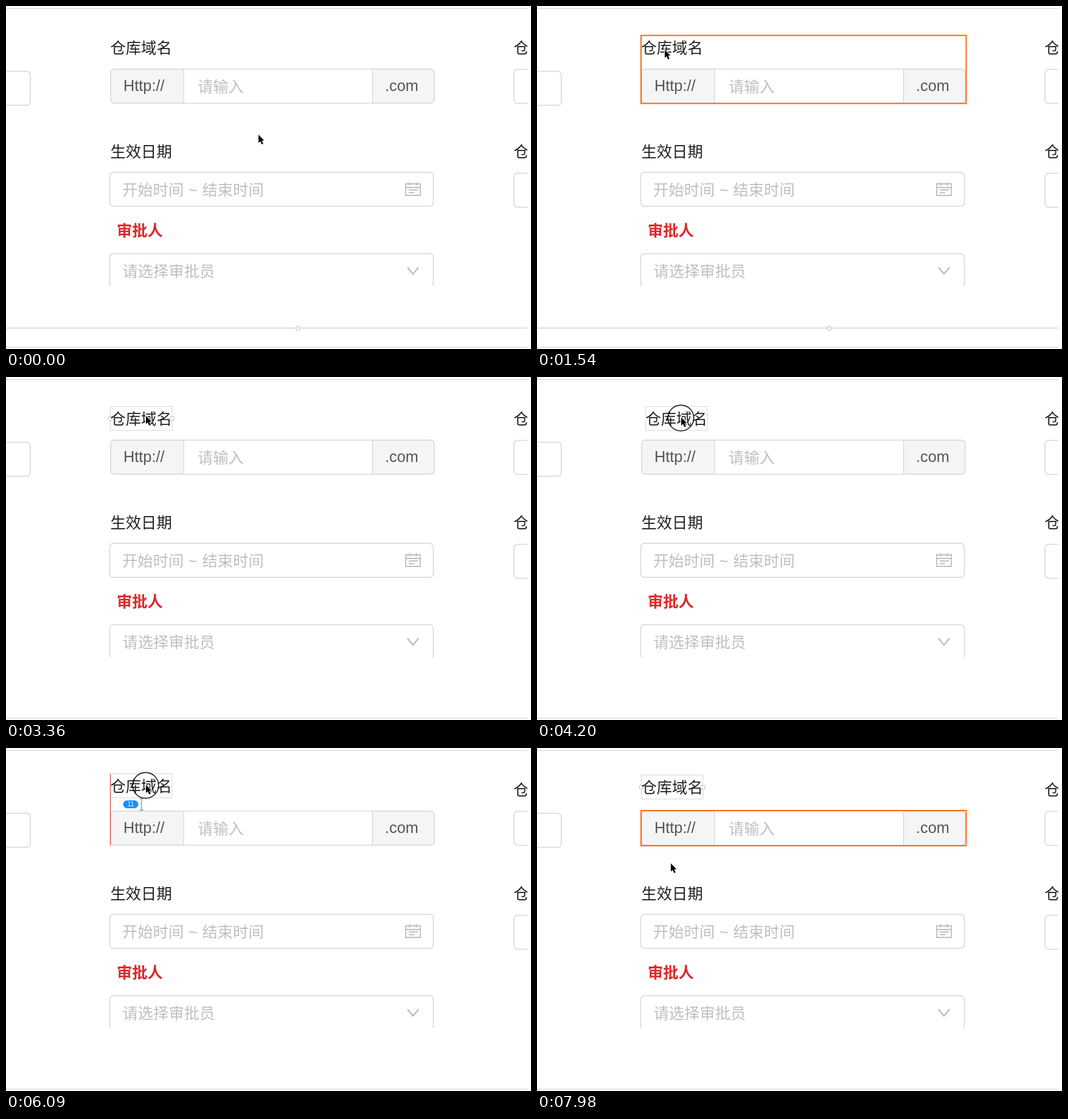
Write an HTML page with a canvas that moves like this. It is 863x565 px and loops after 8 s.

```html
<!DOCTYPE html>
<html lang="zh-CN">
<head>
<meta charset="utf-8">
<style>
html, body { margin: 0; width: 100%; height: 100%; overflow: hidden; background: #fff; }
canvas { display: block; }
</style>
</head>
<body>
<canvas id="stage" width="863" height="565"></canvas>
<script>
const ctx = document.getElementById('stage').getContext('2d');
const LOOP = 8000, STEP = 70;
const CJK = '"Noto Sans CJK SC", "Noto Sans CJK", sans-serif';
const LATIN = '"Liberation Sans", Arial, sans-serif';
const INK = '#222', HINT = '#bfbfbf', BORDER = '#d6d6d6', ORANGE = '#f56a14', BLUE = '#1890ff';

const ARROW = new Path2D('M0 0V13.5L3 10.8L5.4 16L7.8 15L5.5 9.8L9.3 9.5Z');
const CHEVRON = new Path2D('M660 430.5L669 441.5L678 430.5');
const CALENDAR = new Path2D('M657 293H681V312H657ZM657 299H681M663.5 290V296M674.5 290V296M662 303H677M662 307.5H671');

// Eased progress from 0 to 1 between two times
function ramp(t, from, to) {
  const k = Math.min(1, Math.max(0, (t - from) / (to - from)));
  return k * k * (3 - 2 * k);
}
const mix = (a, b, k) => a.map((v, i) => v + (b[i] - v) * k);
const within = (t, from, to) => t >= from && t < to;

function text(str, x, y, color, font = CJK, style = '25.3px') {
  ctx.font = style + ' ' + font;
  ctx.fillStyle = color;
  ctx.fillText(str, x, y);
}

function stroke(path, color, width) {
  ctx.strokeStyle = color;
  ctx.lineWidth = width;
  ctx.stroke(path);
}

function line(x1, y1, x2, y2, color = BORDER, width = 1.3) {
  stroke(new Path2D(`M${x1} ${y1}L${x2} ${y2}`), color, width);
}

function box(x, y, w, h, r = 0, color = BORDER, width = 1.5, fill) {
  const path = new Path2D();
  path.roundRect(x, y, w, h, r);
  if (fill) { ctx.fillStyle = fill; ctx.fill(path); }
  stroke(path, color, width);
}

function ring(x, y, r, color, width) {
  const path = new Path2D();
  path.arc(x, y, r, 0, 2 * Math.PI);
  stroke(path, color, width);
}

const field = (x, y, w, fill) => box(x, y, w, 56, 6, BORDER, 1.5, fill);
const handle = (x, y) => box(x - 3, y - 3, 6, 6, 1, '#b8b8b8', 1, '#fff');
const hover = (y, h) => box(171, y, 534.5, h, 0, ORANGE, 2);

function clipped(w, h, draw) {
  ctx.save();
  ctx.beginPath();
  ctx.rect(0, 0, w, h);
  ctx.clip();
  draw();
  ctx.restore();
}

function drawForm() {
  for (const y of [4, 562]) line(0, y, 857, y, '#dedede');
  field(-20, 107.5, 60);

  field(172, 104, 532, '#f5f5f5');
  ctx.fillStyle = '#fff';
  ctx.fillRect(292, 104.7, 310, 54.6);
  for (const x of [292, 602.5]) line(x, 104, x, 160);
  text('Http://', 193, 140, '#555', LATIN);
  text('.com', 623, 140, '#555', LATIN);
  text('请输入', 315, 142, HINT);

  text('生效日期', 171.5, 249, INK);
  field(170.5, 274, 532);
  text('开始时间', 191, 312, HINT);
  text('~', 300, 312, HINT, LATIN);
  text('结束时间', 322.5, 312, HINT);
  stroke(CALENDAR, HINT, 1.8);

  text('审批人', 182, 379, '#dc2a2a', CJK, 'bold 25.3px');
  clipped(863, 461.5, () => field(170.5, 408, 532));
  text('请选择审批员', 191.5, 446, HINT);
  stroke(CHEVRON, '#b5b5b5', 2);

  clipped(857, 565, () => {
    for (const y of [78, 249]) {
      text('仓库', 834.5, y, INK);
      field(835, y + 26.5, 60);
    }
  });
}

function drawGroupSelection() {
  const [left, right, top, bottom] = [171.5, 704.5, 48.5, 160.5];
  box(left, top, right - left, bottom - top, 0, '#c8c8c8', 1);
  for (const y of [top, bottom]) for (const x of [left, 438, right]) handle(x, y);
  for (const x of [left, right]) handle(x, 105);
  box(420, 94, 36, 4, 2, '#bdbdbd', 1, '#fff');
  ring(725, 180.5, 10, '#bdbdbd', 1.2);
  stroke(new Path2D('M720 182.5H727.5V176'), '#999', 1.3);
}

function drawGuides(top, gap) {
  const bottom = top + 41, mid = (bottom + 102) / 2, wide = gap > 9, w = wide ? 25 : 13;
  line(171.5, top, 171.5, 161, '#e0404a', 1.2);
  line(222.5, bottom, 222.5, 102.5, BLUE, 1);
  for (const y of [bottom, 102.5]) line(219.5, y, 225.5, y, BLUE, 1);
  ctx.fillStyle = BLUE;
  ctx.beginPath();
  ctx.roundRect(217.5 - w, mid - 6.5, w, 13, wide ? 6.5 : 4);
  ctx.fill();
  ctx.textAlign = 'center';
  text(gap, 217.5 - w / 2, mid + 3.7, '#fff', LATIN, '10px');
  ctx.textAlign = 'left';
}

function drawCursor(x, y, pressed) {
  if (pressed) ring(x - 0.5, y + 1, 21.3, '#111', 1.5);
  ctx.save();
  ctx.translate(x, y);
  stroke(ARROW, '#fff', 2);
  ctx.fillStyle = '#000';
  ctx.fill(ARROW);
  ctx.restore();
}

function cursorAt(t, dx, dy) {
  const hovering = mix([415, 212], [210, 72], ramp(t, 350, 1120));
  const [x, y] = mix(hovering, [230, 64], ramp(t, 1540, 1750));
  const held = [x + dx, y + dy + 2.5 * ramp(t, 3780, 3990)];
  return mix(held, [220, 190], ramp(t, 7770, 7980));
}

function drawLabelSelection(t, dx, dy, gap) {
  const left = 171.5 + dx, top = 48.5 + dy;
  box(left, top, 101.5, 39.5, 0, '#d4d4d4', 1);
  if (within(t, 4410, 7350) && dx === 0) drawGuides(top, gap);
  if (!within(t, 4130, 7630)) for (const x of [left, left + 101.5]) handle(x, top + 20);
}

function render(t) {
  const dx = Math.round(7 * (ramp(t, 4060, 4200) - ramp(t, 4690, 4970)));
  const gap = Math.round(8 - ramp(t, 5180, 5390) + 4 * ramp(t, 5810, 6160) - ramp(t, 6300, 6860));
  const dy = (8 - gap) * 2;
  const [x, y] = cursorAt(t, dx, dy);
  const doubleClick = within(t, 2450, 2870) && !within(t, 2590, 2660);
  const pressed = within(t, 1890, 2240) || doubleClick || within(t, 3780, 7420);

  ctx.fillStyle = '#fff';
  ctx.fillRect(0, 0, 863, 565);
  drawForm();
  if (t < 1890) {
    line(0, 530.5, 857, 530.5, '#d4d4d4');
    handle(480, 531);
    if (y < 160) hover(48.5, 112);
  } else if (t < 3080) {
    drawGroupSelection();
  } else {
    drawLabelSelection(t, dx, dy, gap);
    if (t >= 7910) hover(103, 58);
  }
  text('仓库域名', 171.5 + dx, 78 + dy, INK);
  drawCursor(x, y, pressed);
}

function frame(now) {
  render(Math.floor(now % LOOP / STEP) * STEP);
  requestAnimationFrame(frame);
}
render(0);
requestAnimationFrame(frame);
</script>
</body>
</html>
```
